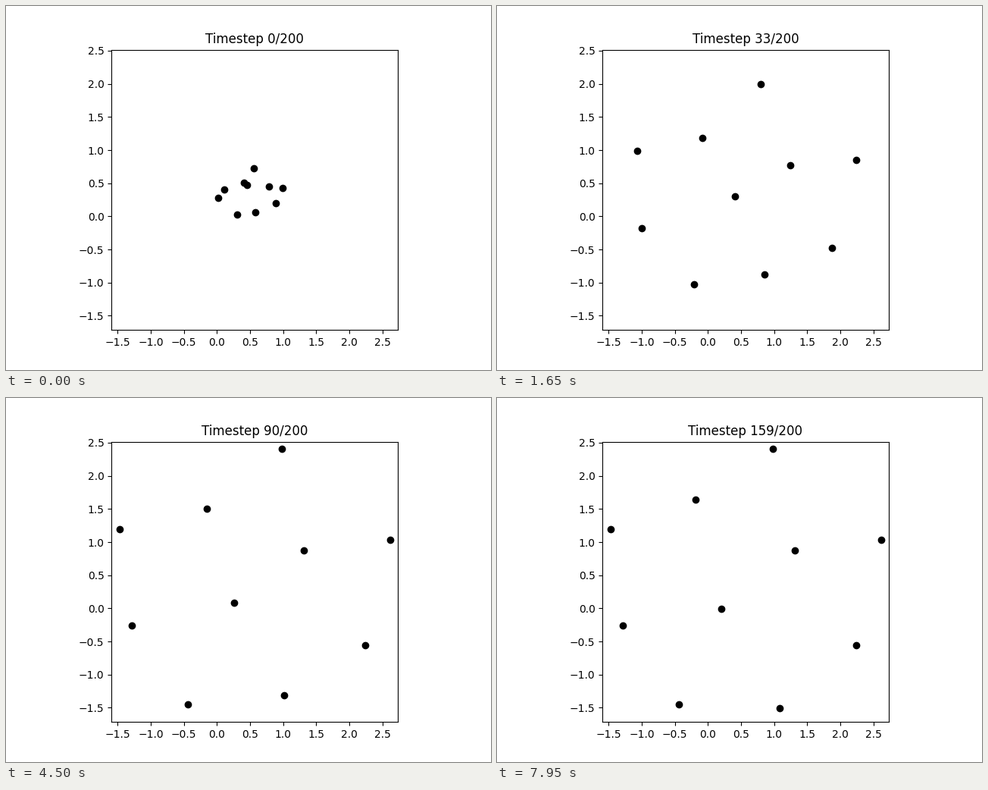
A matplotlib script for the animation above (8 s loop, 640 px wide and 480 px high).

```python
import numpy as np
import matplotlib.pyplot as plt
from matplotlib.animation import FuncAnimation

STEPS, TOTAL = 160, 200
BURST = 21                       # steps of the first fast spread
QUICK, SLOW = 75, 138            # steps to settle: outer ring, inner particles
SCALE = 369.6 / 4.231            # pixels per data unit
ORIGIN = np.array([278.3, 277.36])

# start, place after the burst, resting place (pixels), settling time
PARTICLES = [
    ((280, 253), (202, 290), (166, 300), QUICK),
    ((288, 242), (199, 198), (150, 173), QUICK),
    ((305, 275), (269, 351), (240, 404), QUICK),
    ((314, 233), (273, 182), (262, 134), SLOW),
    ((318, 236), (317, 246), (296, 278), SLOW),
    ((327, 214), (341, 118), (364, 67), QUICK),
    ((329, 272), (349, 343), (373, 409), SLOW),
    ((347, 238), (385, 214), (393, 201), QUICK),
    ((356, 260), (428, 316), (474, 326), QUICK),
    ((365, 240), (460, 209), (507, 187), QUICK),
]


def position(step, start, spread, rest, settle):
    """Power-law burst, then a quadratic ease-out to rest, in data units."""
    start, spread, rest = map(np.array, (start, spread, rest))
    if step < BURST:
        px = start + (spread - start) * (step / BURST) ** 0.42
    else:
        left = 1 - min((step - BURST) / settle, 1)
        px = rest + (spread - rest) * left ** 2
    return (px - ORIGIN) / SCALE * [1, -1]


fig, ax = plt.subplots(figsize=(6.4, 4.8), dpi=100)
ax.set_aspect("equal")
ax.set_xlim(-1.592, 2.730)
ax.set_ylim(-1.7153, 2.5157)
ax.set_xticks(np.arange(-1.5, 2.6, 0.5))
ax.set_yticks(np.arange(-1.5, 2.6, 0.5))
dots = ax.scatter([], [], color="black")
title = ax.set_title("")


def update(step):
    dots.set_offsets([position(step, *p) for p in PARTICLES])
    title.set_text(f"Timestep {step}/{TOTAL}")
    return dots, title


anim = FuncAnimation(fig, update, frames=STEPS, interval=50, repeat=True)
plt.show()
```
